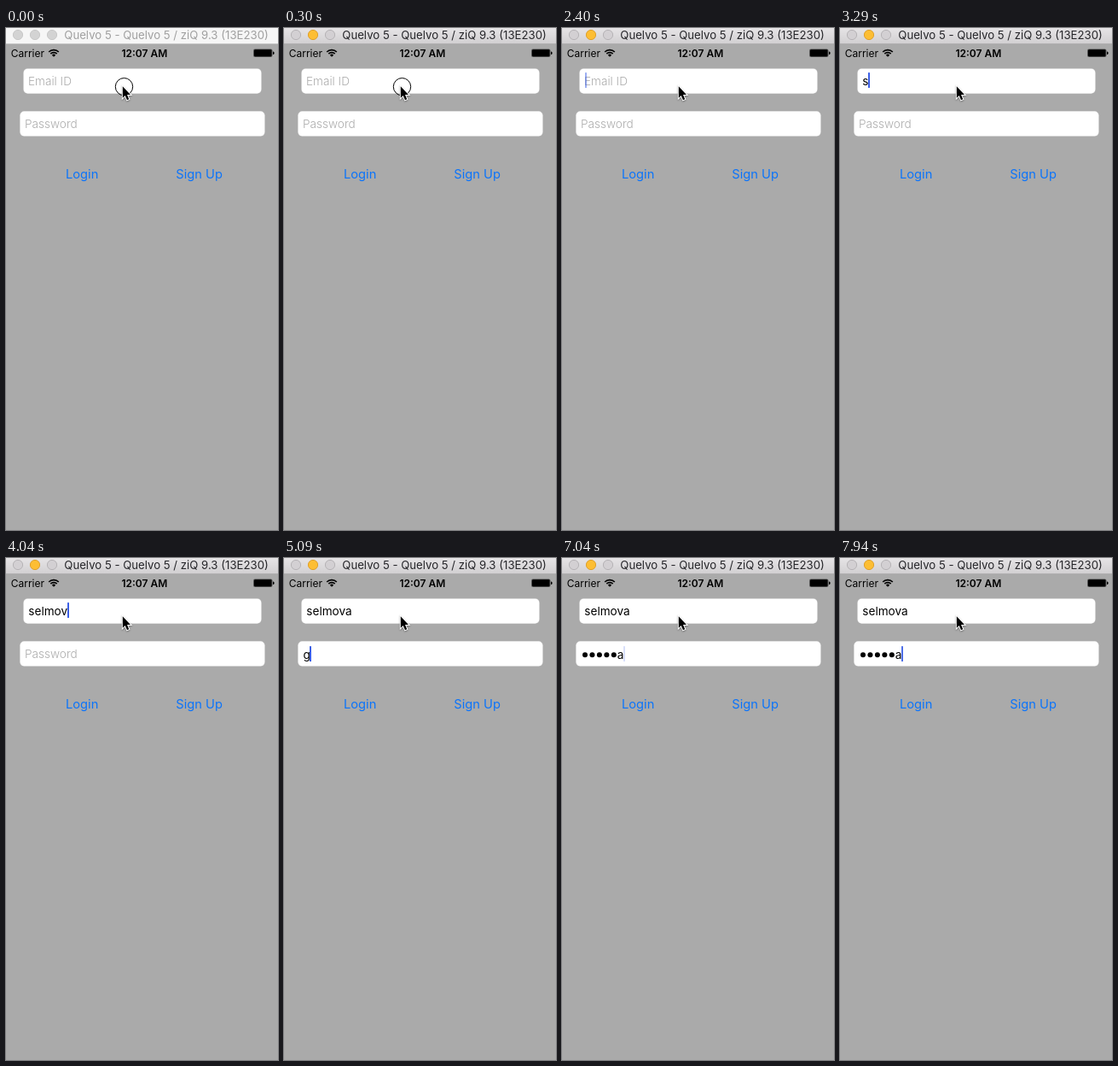
An HTML page with a canvas for the animation above (8 s loop, 319x587 px).

```html
<!DOCTYPE html>
<html lang="en">
<head>
<meta charset="utf-8">
<title>Login form</title>
<style>
  html, body { margin: 0; width: 100%; height: 100%; overflow: hidden; background: #aaa; }
  canvas { display: block; width: 319px; height: 587px; }
</style>
</head>
<body>
<canvas id="stage"></canvas>
<script>
const W = 319, H = 587, LOOP = 8000;
const FONT = 'Inter, Roboto, "Liberation Sans", sans-serif';
const INK = '#000', LINK = '#0b74fb', CARET = '#3a5ee6', HINT = '#adadad';
const FIELD_FONT = '400 13.6px ' + FONT;
const TITLE = 'Quelvo 5 - Quelvo 5 / ziQ 9.3 (13E230)';
const EMAIL = 'selmova', SECRET = 'gujhfa';
const DOT_STEP = 8.45;

// [time, value] steps; each value holds until the next time
const emailCaret = [[0, 0], [450, 1], [900, .4], [1050, 0], [1500, 1], [1950, .4],
  [2100, 0], [2400, .5], [2550, 1], [4640, 0]];
const secretCaret = [[0, 0], [4640, 1], [6890, .6], [7040, .2], [7190, 0],
  [7490, .5], [7640, 1], [7940, .9]];
const secretCount = [[0, 0], [5090, 1], [5840, 2], [6140, 3], [6290, 5], [6440, 6]];

const canvas = document.getElementById('stage');
const ctx = canvas.getContext('2d');
const dpr = window.devicePixelRatio || 1;
canvas.width = W * dpr;
canvas.height = H * dpr;

function valueAt(steps, t) {
  let value = steps[0][1];
  for (const [start, v] of steps) if (t >= start) value = v;
  return value;
}

function emailCount(t) {
  if (t < 2850) return 0;
  return Math.min(EMAIL.length, Math.max(1, Math.floor((t - 3290) / 150) + 1));
}

function text(str, x, y, font, color, align = 'left') {
  ctx.font = font;
  ctx.fillStyle = color;
  ctx.textAlign = align;
  ctx.fillText(str, x, y);
}

function circle(x, y, r, fill, stroke) {
  ctx.beginPath();
  ctx.arc(x, y, r, 0, Math.PI * 2);
  if (fill) { ctx.fillStyle = fill; ctx.fill(); }
  if (stroke) { ctx.strokeStyle = stroke; ctx.lineWidth = 1; ctx.stroke(); }
}

function box(x, y, w, h, r, fill) {
  ctx.beginPath();
  ctx.roundRect(x, y, w, h, r);
  ctx.fillStyle = fill;
  ctx.fill();
}

function caret(x, y, h, alpha) {
  ctx.globalAlpha = alpha;
  box(Math.floor(x), y, 2, h, .6, CARET);
  ctx.globalAlpha = 1;
}

function titleBar(active) {
  if (active) {
    const g = ctx.createLinearGradient(0, 0, 0, 18);
    g.addColorStop(0, '#e6e4e6');
    g.addColorStop(1, '#d2d0d2');
    ctx.fillStyle = g;
  } else {
    ctx.fillStyle = '#f6f6f6';
  }
  ctx.fillRect(0, 0, W, 18);
  ctx.fillStyle = active ? '#b4b2b4' : '#d2d2d2';
  ctx.fillRect(0, 18, W, .7);
  [14, 34, 54].forEach((x, i) => {
    if (!active) circle(x, 8, 5.6, '#d3d3d3', '#c8c8c8');
    else if (i === 1) circle(x, 8, 5.6, '#fdbe33', '#dfa02a');
    else circle(x, 8, 5.6, '#d3d0d3', '#b6b3b6');
  });
  text(TITLE, 68.3, 13, '400 13.2px ' + FONT, active ? '#26262a' : '#a0a0a0');
}

function wifi() {
  const x = 56, y = 33.8, a = Math.PI / 4;
  ctx.strokeStyle = ctx.fillStyle = INK;
  ctx.lineWidth = 1.7;
  for (const r of [5.2, 8.2]) {
    ctx.beginPath();
    ctx.arc(x, y, r, -Math.PI / 2 - a, -Math.PI / 2 + a);
    ctx.stroke();
  }
  ctx.beginPath();
  ctx.moveTo(x, y);
  ctx.arc(x, y, 3, -Math.PI / 2 - a, -Math.PI / 2 + a);
  ctx.fill();
}

function statusBar() {
  text('Carrier', 5.7, 33.5, '400 12px ' + FONT, INK);
  wifi();
  text('12:07 AM', 162.3, 33.5, '600 12px ' + FONT, INK, 'center');
  box(290, 24.5, 22.5, 9.5, 2, '#555');
  box(291, 25.3, 20.5, 7.9, 1.2, INK);
  box(313, 27.5, 1.6, 3.6, [0, 1.5, 1.5, 0], INK);
}

function field(x, y, w) {
  box(x, y, w, 29.5, 5, '#ccc');
  box(x + .4, y + .4, w - .8, 28.7, 4.7, '#fff');
}

function emailField(t) {
  const x = 26.3, typed = EMAIL.slice(0, emailCount(t));
  field(20.3, 47.3, 279.4);
  if (typed) text(typed, x, 66.5, FIELD_FONT, INK);
  else text('Email ID', x - .3, 66.5, '300 13.6px ' + FONT, HINT);
  ctx.font = FIELD_FONT;
  const end = typed ? x + ctx.measureText(typed).width : 27;
  caret(end, 52, 18, valueAt(emailCaret, t));
}

function secretField(t) {
  const x = 22.6, n = valueAt(secretCount, t), alpha = valueAt(secretCaret, t);
  field(16.2, 97.2, 287.5);
  if (!n) {
    text('Password', x - .6, 116.5, '300 13.6px ' + FONT, HINT);
    caret(23, 102, 17, alpha);
    return;
  }
  for (let i = 0; i < n - 1; i++) circle(x + 4.4 + i * DOT_STEP, 113.2, 3, INK);
  const last = SECRET[n - 1], left = x + (n - 1) * DOT_STEP;
  text(last, left, 117.8, FIELD_FONT, INK);
  caret(left + ctx.measureText(last).width, 103, 18, alpha);
}

function pointer() {
  const arrow = new Path2D('M136.8 68.2V81.8L139.8 78.9L142 84.2L144.2 83.3L142 78.1H146Z');
  ctx.save();
  ctx.shadowColor = 'rgba(0,0,0,.35)';
  ctx.shadowBlur = 2 * dpr;
  ctx.shadowOffsetY = dpr;
  ctx.strokeStyle = '#fff';
  ctx.lineWidth = 2;
  ctx.stroke(arrow);
  ctx.restore();
  ctx.fillStyle = INK;
  ctx.fill(arrow);
}

function draw(t) {
  ctx.setTransform(dpr, 0, 0, dpr, 0, 0);
  ctx.fillStyle = '#aaa';
  ctx.fillRect(0, 0, W, H);
  titleBar(t >= 150);
  statusBar();
  emailField(t);
  secretField(t);
  text('Login', 70, 176.4, '400 14.7px ' + FONT, LINK);
  text('Sign Up', 199.3, 176.4, '400 14.7px ' + FONT, LINK);
  if (t < 450) circle(138.5, 68.7, 10.2, null, INK);
  pointer();
}

const start = performance.now();
function tick() {
  draw((performance.now() - start) % LOOP);
  requestAnimationFrame(tick);
}
tick();
</script>
</body>
</html>
```
